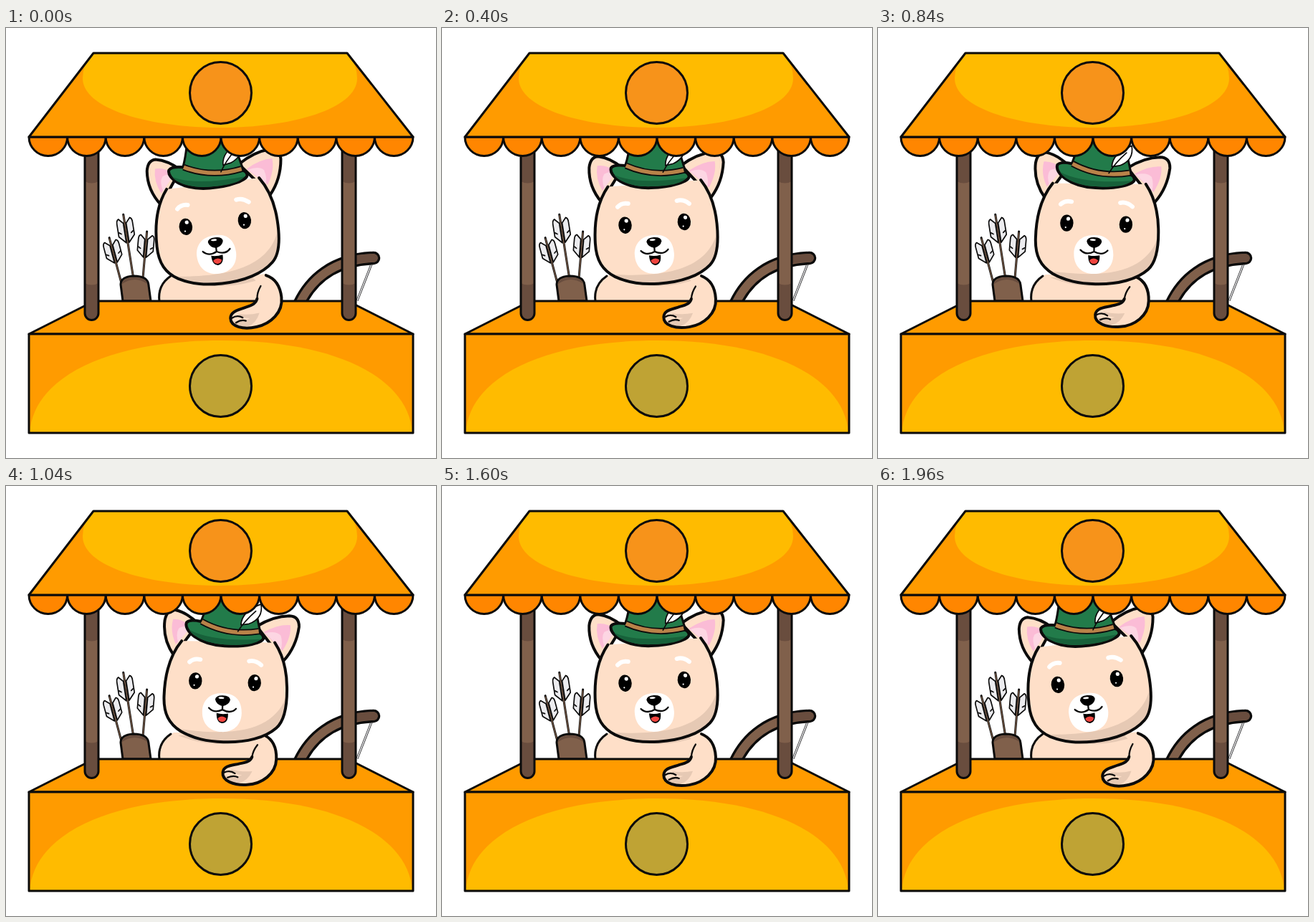
Animation of 600x600 px, one loop 2000 ms. Source, as an HTML page:

```html
<!DOCTYPE html>
<html lang="en">
<head>
<meta charset="utf-8">
<title>Market stall</title>
<style>
  html, body { margin: 0; width: 100%; height: 100%; overflow: hidden; background: #fff; }
  svg { display: block; width: 100vw; height: 100vh; }
  .line { stroke: #0b0b0b; stroke-width: 3; stroke-linecap: round; stroke-linejoin: round; }
  .bold { stroke-width: 4; }
  .medium { stroke-width: 2.3; }
  .thin { stroke-width: 1.7; }
  .open { fill: none; }
  .orange { fill: #ff9b00; }
  .deepOrange { fill: #ff8600; }
  .amber { fill: #ffbb00; }
  .skin { fill: #fedfc8; }
  .shade { fill: #e6c9b4; }
  .pink { fill: #fbbcd6; }
  .white { fill: #fff; }
  .wood { fill: #80604b; }
  .dark { fill: #694d3e; }
  .green { fill: #227b4a; }
  .deep { fill: #17613a; }
</style>
</head>
<body>
<svg viewBox="0 0 600 600">
  <defs>
    <path id="face" d="M240 218C226 236 218 262 218 296C218 320 226 334 243 344C262 354 280 357 303 357C335 357 361 349 376 335C388 324 390 300 389 278C388 255 382 233 370 216"/>
    <clipPath id="headClip"><use href="#face"/></clipPath>
    <clipPath id="roofClip"><path d="M122 35H476L568 152H32Z"/></clipPath>
    <clipPath id="bowClip"><path d="M395 300H600V381H395Z"/></clipPath>
    <g id="arrow">
      <path class="line open" d="M0 -19V62"/>
      <path class="open" d="M0 -18V62" stroke="#80604b" stroke-width="1.3"/>
      <path class="line thin" fill="#ececef" d="M-2 -8L-8 -14Q-11 -13 -11 -8V8L-2 17ZM2 -8L8 -14Q11 -13 11 -8V8L2 17Z"/>
      <path class="line open thin" d="M-10 3L-7 5M10 3L7 5"/>
    </g>
  </defs>

  <!-- quiver -->
  <use href="#arrow" transform="translate(149 311) rotate(-15)"/>
  <use href="#arrow" transform="translate(167 281) rotate(-9) scale(1 1.1)"/>
  <use href="#arrow" transform="translate(195 303) rotate(5)"/>
  <path class="line wood" d="M160 358Q160 347 178 346Q198 346 199 359L202 381H163Z"/>
  <path class="dark" d="M162 357Q163 349 178 348Q196 348 197 357Q180 345 162 357Z"/>

  <!-- bow -->
  <g clip-path="url(#bowClip)" class="open" stroke-linecap="round">
    <path d="M511 327L487 388" stroke="#222" stroke-width="3"/>
    <path d="M511 327L487 388" stroke="#e9e9ec" stroke-width="1.5"/>
    <path d="M408 388C424 352 456 323 513 321" stroke="#0b0b0b" stroke-width="18.5"/>
    <path d="M408 388C424 352 456 323 513 321" stroke="#80604b" stroke-width="11.5"/>
    <path d="M491 322.5Q502 321 513 321" stroke="#694d3e" stroke-width="11.5"/>
  </g>

  <!-- body -->
  <path class="skin" d="M214 384C212 366 218 354 234 344H360V384Z"/>
  <path class="shade" d="M240 348Q300 372 362 348Z"/>
  <path class="line open" d="M214 382C212 366 218 354 230 346"/>

  <!-- counter -->
  <path class="line orange" d="M123 381H477L568 427H32Z"/>
  <path class="orange" d="M32 427H568V565H32Z"/>
  <path class="amber" d="M33 565C38 488 140 436 300 436C460 436 562 488 567 565Z"/>
  <path class="line open" d="M32 427H568V565H32Z"/>
  <circle class="line" cx="299.5" cy="499.5" r="43" fill="#bfa334"/>
  <g id="posts"></g>

  <g id="arm">
    <path class="skin" d="M340 345H361C374 353 379 366 379 380C379 401 360 415 340 417C321 419 304 413 305 401C306 391 318 391 328 388C338 386 343 384 345 378Q346 369 352 361Z"/>
    <path class="shade" d="M308 405Q320 409 332 404Q320 403 316 396Q330 400 346 398Q340 412 328 415Q312 415 308 405Z"/>
    <path class="line open bold" d="M361 347C374 353 379 366 379 380C379 401 360 415 340 417C321 419 304 413 305 401C306 391 318 391 328 388C338 386 343 384 345 378"/>
    <path class="line open medium" d="M345 378Q346 369 352 361M307 401Q315 397 322 402M312 408Q320 404 326 407"/>
  </g>

  <g id="head">
    <path class="line bold skin" d="M230 239C218 223 214 206 215.500 190Q218 175 229 175Q246 178 262 193Z"/>
    <path class="pink" d="M232 223Q223 205 227 188Q241 187 252 198Z"/>
    <path fill="#fdd6e3" d="M235 220Q231 207 236 200Q243 196 252 199Z"/>
    <path class="line bold skin" d="M344 194Q367 179 389 178Q403 178 403 193Q400 221 383 241Z"/>
    <path class="pink" d="M354 202Q374 190 391 191Q393 207 381 227Z"/>
    <path fill="#fdd6e3" d="M356 203Q372 199 378 206Q381 215 379 225Z"/>
    <g clip-path="url(#headClip)">
      <path class="skin" d="M200 170H400V370H200Z"/>
      <path class="shade" d="M391 282C380 329 338 353 236 340L250 370H400Z"/>
    </g>
    <use href="#face" class="line bold open"/>

    <path class="open" d="M252 247Q258 241 267 243M335 243Q344 241 352 248" stroke="#fff" stroke-width="6" stroke-linecap="round"/>
    <ellipse cx="261" cy="273" rx="9.2" ry="11.7"/>
    <ellipse cx="343.5" cy="273" rx="9.2" ry="11.7"/>
    <g class="white">
      <circle cx="263" cy="267" r="2.6"/><circle cx="345.5" cy="267" r="2.6"/>
      <circle cx="259.500" cy="279" r="1.1"/><circle cx="342" cy="279" r="1.1"/>
      <path d="M300 289C320 288 327 302 327 316C327 334 315 343 300 343C284 343 272 333 272 315C272 301 281 289 300 289Z"/>
    </g>
    <path d="M292 317Q300 319 308 317Q309 330 300 331Q292 330 292 317Z"/>
    <path d="M294 324Q300 319 306 324Q305 329 300 329Q295 329 294 324Z" fill="#f0453f"/>
    <path class="line open medium" d="M281 310Q289 318 300 312Q312 318 319 310M300 303V312"/>
    <path d="M289.500 298Q290 292 300 292Q310 292 310.500 298Q309 305 300 307Q291 305 289.500 298Z"/>
    <ellipse class="white" cx="298" cy="295.5" rx="4" ry="1.4"/>

    <path class="line green" d="M264 194Q271 180 277 148H336Q344 180 350 206L320 214Z"/>
    <path class="line bold green" d="M266 190Q250 187 246 192C242 203 263 222 300 223C329 224 354 217 354 210Q353 204 347 203Q300 209 266 190Z"/>
    <path class="deep" d="M250 202Q282 218 350 212C343 220 323 222 300 221C272 220 254 210 250 202Z"/>
    <path class="open" d="M267 190Q304 209 347 201" stroke="#0b0b0b" stroke-width="9"/>
    <path class="open" d="M267 190Q304 209 347 201" stroke="#b98249" stroke-width="5.5"/>
    <path class="line thin white" d="M322 193Q322 174 349 163Q353 183 333 191Z"/>
    <path class="line open thin" d="M318 202Q326 188 342 173"/>
  </g>

  <!-- awning -->
  <g id="scallops"></g>
  <path class="orange" d="M122 35H476L568 152H32Z"/>
  <path class="amber" clip-path="url(#roofClip)" d="M120 34Q107 52 107 70C107 113 200 139 299 139C398 139 490 113 490 70Q490 52 477 34Z"/>
  <path class="line open" d="M122 35H476L568 152H32Z"/>
  <circle class="line" cx="299.5" cy="90.5" r="43" fill="#f7931a"/>
</svg>
<script>
  const byId = id => document.getElementById(id);
  const LOOP = 2000, STEP = 40, REST = 0.758;
  const SCALLOPS = 10, SCALLOP_WIDTH = 536 / SCALLOPS;

  byId("posts").innerHTML = [119.5, 478.5].map(x => {
    const left = x - 9.5;
    const outline = `M${left} 152V398a9.5 9.5 0 0 0 19 0V152Z`;
    return `
      <path class="wood" d="${outline}"/>
      <path class="dark" d="M${left} 152h19V214q-9.5 5 -19 0Z"/>
      <path class="dark" d="M${left} 356q9.5 5 19 0V398a9.5 9.5 0 0 1 -19 0Z"/>
      <path class="line open" d="${outline}"/>`;
  }).join("");

  byId("scallops").innerHTML = Array.from({ length: SCALLOPS }, (_, i) =>
    `<path class="line deepOrange" d="M${32 + i * SCALLOP_WIDTH} 152a${SCALLOP_WIDTH / 2} 26.5 0 0 0 ${SCALLOP_WIDTH} 0Z"/>`
  ).join("");

  const smooth = u => u * u * (3 - 2 * u);

  function draw(time) {
    // The small bias keeps clock jitter from holding a pose one step too long.
    const t = Math.floor(time / STEP + 0.1) * STEP % LOOP;
    const sway = smooth(1 - Math.abs(1 - t / (LOOP / 2))) - REST;
    byId("head").setAttribute("transform", `rotate(${sway * 8.1} 297 370)`);
    byId("arm").setAttribute("transform", `rotate(${sway * 8.5} 345 330)`);
  }

  const start = performance.now();
  function tick() {
    draw(performance.now() - start);
    requestAnimationFrame(tick);
  }
  tick();
</script>
</body>
</html>
```
